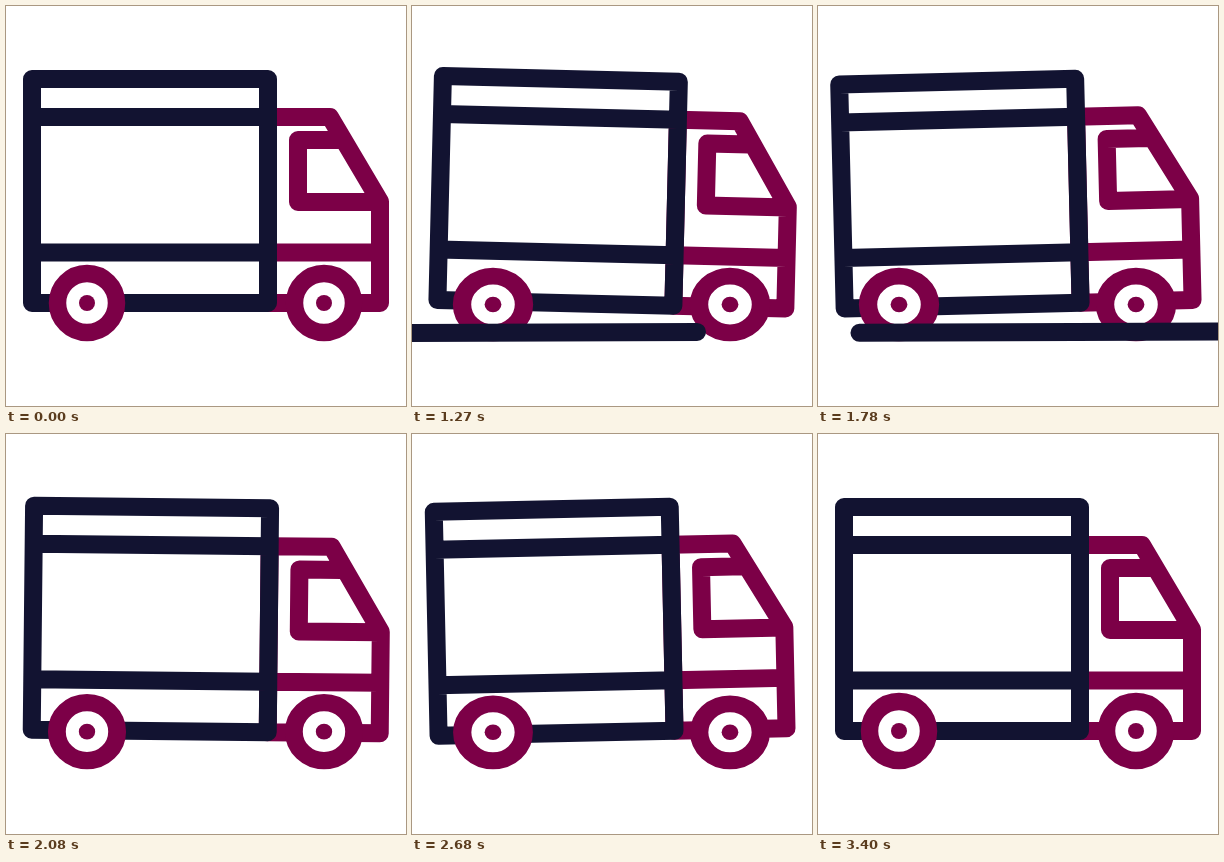
Recreate the animation shown at these times as an HTML page. Size 400 by 400 pixels, loop 3.43 s.

```html
<!DOCTYPE html>
<html lang="en">
<head>
<meta charset="utf-8">
<title>Delivery truck</title>
<style>
  html, body { margin: 0; width: 100%; height: 100%; overflow: hidden; background: #fff; }
  svg { display: block; width: 100%; height: 100%; }
  .line { fill: none; stroke-width: 18; stroke-linecap: round; stroke-linejoin: round; }
  .navy { stroke: #121331; }
  .plum { stroke: #7c0047; }
  .tyre { fill: #fff; stroke: #7c0047; stroke-width: 17.5; }
  .hub { fill: #7c0047; }
</style>
</head>
<body>
<svg viewBox="0 0 400 400">
  <g id="body">
    <path class="line plum" d="M262 111H324L374 195.5V297H262ZM262 246.5H374M334 134H292V196H374"/>
    <path class="line navy" d="M26 73H262V297H26ZM26 111H262M26 246.5H262"/>
  </g>
  <g class="wheel">
    <circle class="tyre" cx="81" cy="297" r="29.5"/>
    <circle class="hub" cx="81" cy="297" r="8"/>
  </g>
  <g class="wheel">
    <circle class="tyre" cx="318" cy="297" r="29.5"/>
    <circle class="hub" cx="318" cy="297" r="8"/>
  </g>
  <path id="road" class="line navy" d="M9 0H465" visibility="hidden"/>
</svg>
<script>
  const LOOP = 3430, HOLD = 1030, STEP = 30;
  const body = document.getElementById('body');
  const road = document.getElementById('road');
  const wheels = [...document.querySelectorAll('.wheel')];
  const wheelX = [81, 318];

  const ease = p => (1 - Math.cos(Math.PI * p)) / 2;

  // Body sway from -1 to 1: ease in, swing between peaks, settle.
  function sway(t) {
    const first = 260, last = 1760, end = 2400;
    if (t < first) return ease(t / first);
    if (t < last) return Math.cos(Math.PI * (t - first) / 500);
    return ease(((t - last) / (end - last)) ** 0.65) - 1;
  }

  // Three strips of road sweep past to the left.
  function drawRoad(t) {
    const start = 38, period = 595, speed = 2.5;
    const n = Math.floor((t - start) / period);
    const x = 400 - speed * (t - start - n * period);
    const visible = n >= 0 && n < 3 && x > -474;
    road.setAttribute('visibility', visible ? 'visible' : 'hidden');
    road.setAttribute('transform', `translate(0 327) rotate(-.22) translate(${x} 0)`);
  }

  function draw(t) {
    const s = sway(t), squash = Math.abs(s);
    body.setAttribute('transform', `translate(0 ${1.25 * squash}) rotate(${1.4 * s} 200 272)`);
    wheels.forEach((wheel, i) => {
      const x = wheelX[i];
      wheel.setAttribute('transform',
        `translate(${x} 335) scale(${1 + 0.05 * squash} ${1 - 0.04 * squash}) translate(${-x} -335)`);
    });
    drawRoad(t);
  }

  const origin = performance.now();
  function tick() {
    const time = (performance.now() - origin) % LOOP;
    draw(time < HOLD ? 0 : (Math.floor((time - HOLD) / STEP) + 1) * STEP);
    requestAnimationFrame(tick);
  }
  tick();
</script>
</body>
</html>
```
